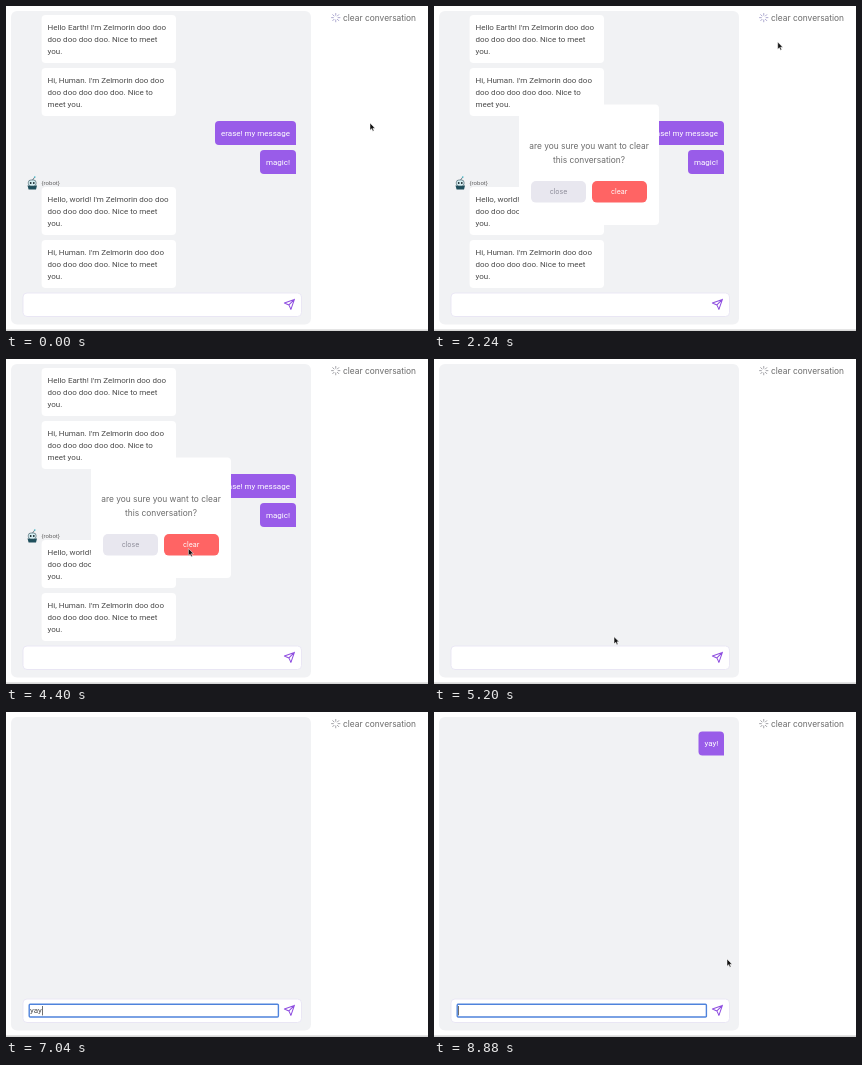
An HTML page for the animation above (8960 ms loop, 422 by 325 pixels).

```html
<!DOCTYPE html>
<html lang="en">
<head>
<meta charset="utf-8">
<title>Clear conversation</title>
<style>
  html, body { margin: 0; width: 100%; height: 100%; overflow: hidden; background: #fff; }
  svg { display: block; width: 422px; height: 325px; }
  text { font: 8px Roboto, sans-serif; fill: #4a4a4a; }
  .wide { font: 8.4px Inter, sans-serif; fill: #6a6a6a; }
  .btn { font: 7px Inter, sans-serif; text-anchor: middle; }
  .mid { text-anchor: middle; }
  .user text { fill: #fff; }
  .user path { fill: #995ce9; }
  .line { fill: none; stroke-linecap: round; stroke-linejoin: round; }
</style>
</head>
<body>
<svg viewBox="0 0 422 325" xmlns="http://www.w3.org/2000/svg">
  <rect width="422" height="325" fill="#fff"/>
  <rect x="5" y="5" width="300" height="313.5" rx="6" fill="#f1f2f4"/>
  <rect y="323.6" width="422" height="1" fill="#bdbdbd"/>

  <g id="spinner" class="line" stroke-width="2" transform="translate(324.7 6.6) scale(.42)"></g>
  <text class="wide" x="337" y="14.6">clear conversation</text>

  <g id="chat">
    <g id="bubbles"></g>
    <text x="35.6" y="179" style="font-size:6px;fill:#666">{robot}</text>
    <g id="robot">
      <path d="M21.5 179.5H31L30 183.6H22.6Z" fill="#1f4f5c"/>
      <rect x="22.3" y="174" width="7.8" height="6" rx="2.6" fill="#d5eef2" stroke="#35505a" stroke-width=".6"/>
      <circle cx="24.7" cy="177" r=".9" fill="#16262c"/>
      <circle cx="27.8" cy="177" r=".9" fill="#16262c"/>
      <path d="M26.6 174L28.6 171.2" stroke="#35505a" stroke-width=".7"/>
      <circle cx="28.8" cy="171.1" r=".8" fill="#3fb4c4"/>
    </g>
  </g>
  <g id="reply"></g>

  <rect x="17" y="287" width="278.5" height="23.5" rx="4" fill="#fff" stroke="#e6e3f3" stroke-width=".8"/>
  <g class="line" stroke="#8f4fe0" stroke-width="2.1" transform="translate(277.4 292.4) scale(.5)">
    <path d="M22 2L11 13M22 2L15 22L11 13L2 9Z"/>
  </g>
  <g id="focus">
    <rect x="23.2" y="292.2" width="249.2" height="12.8" rx="1" fill="#fff" stroke="#4f83dc" stroke-width="1.4"/>
    <text id="typed" x="24" y="301.2"></text>
    <rect id="caret" y="294" width=".7" height="9.4" fill="#333"/>
  </g>

  <g id="dialog">
    <rect x="85" y="98.5" width="140" height="120.5" rx="4" fill="#fff"/>
    <text class="wide mid" x="155" y="143.4">are you sure you want to clear</text>
    <text class="wide mid" x="155" y="157.4">this conversation?</text>
    <rect x="97" y="175" width="55" height="21.6" rx="5" fill="#e8e7ef"/>
    <text class="btn" x="124.5" y="187.6" style="fill:#8d8c99">close</text>
    <rect x="158" y="175" width="55" height="21.6" rx="5" fill="#ff6464"/>
    <text class="btn" x="185.2" y="187.6" style="fill:#fff">clear</text>
  </g>

  <g id="cursor">
    <path id="arrow" d="M0 0V7.2L1.7 5.7L2.8 8.2L4 7.7L2.9 5.2H5.1Z" fill="#111" stroke="#fff" stroke-width=".5"/>
    <path id="beam" class="line" d="M-1.6 -4Q0 -4 0 -3V3Q0 4 -1.6 4M1.6 -4Q0 -4 0 -3M0 3Q0 4 1.6 4M-1 1H1" stroke="#333" stroke-width=".8"/>
  </g>
</svg>
<script>
const LOOP = 8960, STEP = 80;
const el = id => document.getElementById(id);
const show = (id, on) => el(id).setAttribute('visibility', on ? 'visible' : 'hidden');

const botBubble = (y, lines) =>
  `<rect x="35.6" y="${y}" width="134.4" height="48" rx="4" fill="#fff"/>` +
  lines.map((s, i) => `<text x="41.5" y="${y + 14.8 + 12 * i}">${s}</text>`).join('');

// Rounded on three corners, square at the bottom right
const userBubble = (x, y, s) =>
  `<g class="user"><path d="M${x + 4} ${y}H286Q290 ${y} 290 ${y + 4}V${y + 24}H${x + 4}` +
  `Q${x} ${y + 24} ${x} ${y + 20}V${y + 4}Q${x} ${y} ${x + 4} ${y}Z"/>` +
  `<text x="${x + 6}" y="${y + 14.8}">${s}</text></g>`;

const intro = hi => [hi + " I'm Zelmorin doo doo", 'doo doo doo doo. Nice to meet', 'you.'];
const human = ["Hi, Human. I'm Zelmorin doo doo", 'doo doo doo doo doo. Nice to', 'meet you.'];
human[1] = 'doo doo doo doo doo. Nice to meet'.slice(0, 28);
human[2] = 'you.';

el('bubbles').innerHTML =
  botBubble(9, intro('Hello Earth!')) +
  botBubble(62, ["Hi, Human. I'm Zelmorin doo doo", 'doo doo doo doo doo. Nice to', 'meet you.']) +
  userBubble(209, 115, 'erase! my message') +
  userBubble(254, 144, 'magic!') +
  botBubble(181, intro('Hello, world!')) +
  botBubble(234, ["Hi, Human. I'm Zelmorin doo doo", 'doo doo doo doo. Nice to meet', 'you.']);
el('reply').innerHTML = userBubble(264.5, 19.5, 'yay!');

el('spinner').innerHTML = Array.from({ length: 8 }, (_, i) =>
  `<path d="M12 2V6.4" transform="rotate(${i * 45} 12 12)"/>`).join('');

// time, x, y
const route = [
  [80, 364, 117], [960, 362.5, 13], [2000, 362.5, 13], [3040, 223.5, 183],
  [3760, 182.4, 189.5], [4960, 182.4, 189.5], [5280, 179.6, 294],
  [8400, 179.6, 294], [8880, 293, 247]
];

function cursorAt(t) {
  const i = route.findIndex(p => p[0] > t);
  if (i < 0) return route[route.length - 1].slice(1);
  if (i === 0) return route[0].slice(1);
  const [t0, x0, y0] = route[i - 1], [t1, x1, y1] = route[i];
  const u = (t - t0) / (t1 - t0), e = u * u * (3 - 2 * u);
  return [x0 + (x1 - x0) * e, y0 + (y1 - y0) * e];
}

const typing = [[6640, 'y'], [6800, 'ya'], [7040, 'yay'], [7360, 'yay!'], [7840, '']];

function draw(t) {
  show('chat', t < 4800);
  show('dialog', t >= 1760 && t < 4800);
  show('reply', t >= 7840);
  el('spinner').setAttribute('stroke', t < 3920 ? '#9f9ac8' : '#929298');

  const focused = t >= 6000;
  const word = typing.reduce((w, [at, s]) => t >= at ? s : w, '');
  show('focus', focused);
  el('typed').textContent = word;
  el('caret').setAttribute('x', 24 + (word ? el('typed').getComputedTextLength() + 0.2 : 0));
  show('caret', focused && !(t >= 6240 && t < 6560));

  const [x, y] = cursorAt(t);
  const visible = t < 6560 || t >= 8480;
  const overText = y < 18 || y > 287;
  el('cursor').setAttribute('transform', `translate(${x.toFixed(2)} ${y.toFixed(2)})`);
  show('arrow', visible && !overText);
  show('beam', visible && overText);
}

function tick() {
  draw(Math.floor(performance.now() % LOOP / STEP) * STEP);
  requestAnimationFrame(tick);
}
tick();
</script>
</body>
</html>
```
